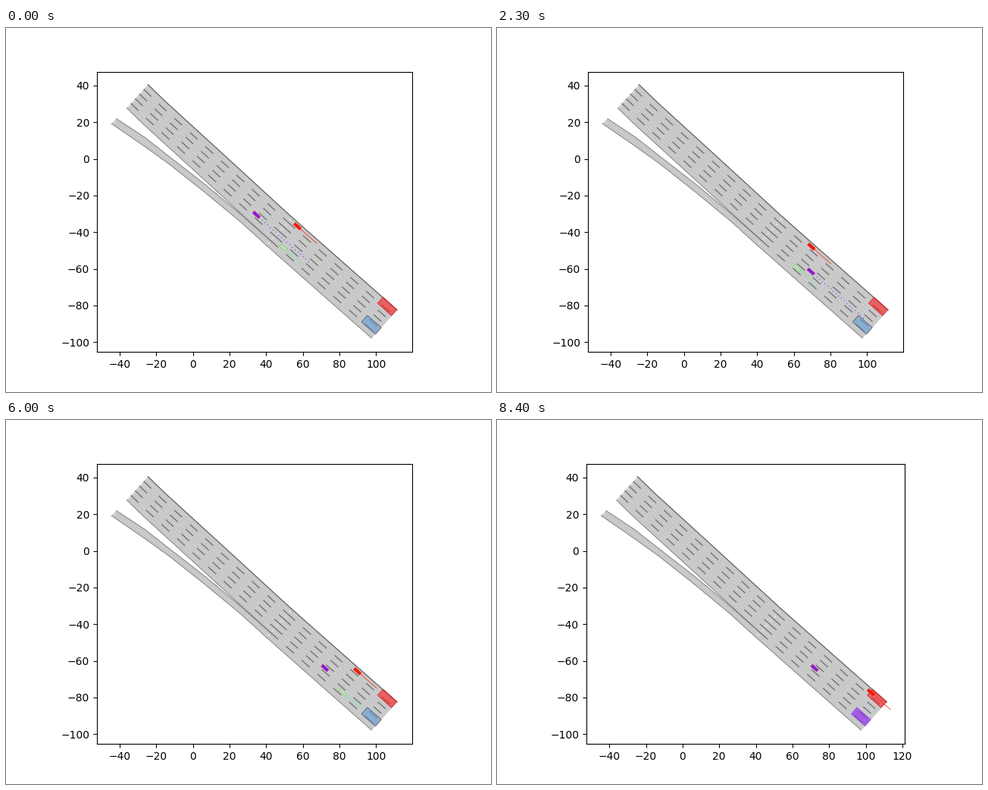
These frames come from a looping animation (640x480 px, 8500 ms). A matplotlib script:

```python
import numpy as np
import matplotlib.pyplot as plt
from matplotlib.animation import FuncAnimation
from matplotlib.patches import Polygon

FRAMES, STEP = 85, 100
LANE = 3.46
NORMAL = np.array([-0.672, -0.741])  # from the outer road edge to the ramp side
X_MIN, X_MAX = -44.68, 111.92
Y_MIN, Y_MAX = -98.4, 40.66
ROAD, MARK, LIGHT = "#c7c7c7", "#555555", "#dddddd"
JOIN = 53.8

# outer road edge, last point extends it past the end
EDGE_X = np.array([-24.6, -14.9, 17.85, 53.0, 79.95, 111.5, 140.0])
EDGE_Y = np.array([40.6, 31.2, 1.35, -30.9, -54.7, -82.5, -107.5])

fig, ax = plt.subplots(figsize=(6.4, 4.8), dpi=100)
ax.set_aspect("equal")


def lateral(x_edge, offset):
    """Points on the line that lies offset metres inside the outer edge."""
    x_edge = np.asarray(x_edge, float)
    y = np.interp(x_edge, EDGE_X, EDGE_Y)
    return np.column_stack([x_edge, y]) + offset * NORMAL


def lane_points(x, lane):
    """Points on the centre line of a lane at the given x."""
    offset = (lane + 0.5) * LANE
    return lateral(np.asarray(x) - offset * NORMAL[0], offset)


def box(center, length, width, angle):
    c, s = np.cos(angle), np.sin(angle)
    corners = np.array([[-1, -1], [1, -1], [1, 1], [-1, 1]]) * [length / 2, width / 2]
    return corners @ np.array([[c, s], [-s, c]]) + center


def line(points, color=MARK, lw=0.45, z=3, **kw):
    return ax.plot(points[:, 0], points[:, 1], color=color, lw=lw, zorder=z, **kw)[0]


def area(points, z=1, **kw):
    return ax.add_patch(Polygon(points, closed=True, zorder=z, **kw))


def start_mark(points):
    d = points[1] - points[0]
    d = d / np.hypot(*d)
    side = np.array([-d[1], d[0]]) * 0.6
    area([points[0] + side, points[0] + 1.4 * d, points[0] - side], z=2.5, fc="#e2e2e2", lw=0)


def draw_section(x_from, x_to, lanes):
    inner = EDGE_X[(EDGE_X > x_from) & (EDGE_X < x_to)]
    xs = np.concatenate([[x_from], inner, [x_to]])
    if xs[1] - xs[0] < 1:
        xs = np.delete(xs, 1)
    for i in range(lanes):
        left, right = lateral(xs, i * LANE), lateral(xs, (i + 1) * LANE)
        area(np.vstack([left, right[::-1]]), fc=ROAD, lw=0)
        middle = (left + right) / 2
        line(middle, LIGHT, 0.3, 2)
        start_mark(middle)
        if i:
            line(left, lw=0.7, dashes=(10 / 0.7, 10 / 0.7))
    line(lateral(xs, 0), lw=0.8)
    line(lateral(xs, lanes * LANE))


def draw_ramp():
    upper = np.array([[-41.8, 22.0], [-26.5, 11.9], [-13.2, 1.5], [6.25, -13.6],
                      [24.0, -28.4], lateral(JOIN, 5 * LANE)[0]])
    lower = np.array([[-44.6, 19.3], [-26.9, 7.1], [-13.2, -2.7], [6.25, -18.1],
                      [26.1, -34.5], lateral(JOIN, 6 * LANE)[0]])
    area(np.vstack([upper, lower[::-1]]), fc=ROAD, lw=0)
    line(upper)
    line(lower)
    middle = (upper + lower) / 2
    line(middle, LIGHT, 0.3, 2)
    start_mark(middle)


draw_ramp()
draw_section(EDGE_X[0], JOIN, 5)
draw_section(JOIN, EDGE_X[-2], 6)

red_goal = area(box((106.1, -80.5), 10.2, 4.5, np.radians(-42)), z=4,
                fc=(1, 0.1, 0.1, 0.6), ec=(0.8, 0.12, 0.15, 0.8), lw=0.6)
lane_goal = area(box((97.45, -90.5), 10.1, 4.8, np.radians(-41)), z=4)


class Car:
    def __init__(self, x, speed, lane, stop, reach, fill, edge, path):
        self.x, self.speed, self.lane = x, speed, lane
        self.stop, self.reach = stop, reach
        self.body = area(np.zeros((4, 2)), z=7, fc=fill, ec=edge, lw=0.5)
        self.paths = [line(np.zeros((1, 2)), z=6, **style) for style in path]

    def place(self, t):
        return self.x + self.speed * min(t, self.stop)

    def horizon(self, t):
        return self.place(t) + self.speed * np.linspace(0, self.reach, 20)

    def update(self, t, shown=True):
        x = self.place(t)
        back, mid, front = lane_points([x - 2, x, x + 2], self.lane)
        d = front - back
        self.body.set_xy(box(mid, 4.4, 1.6, np.arctan2(d[1], d[0])))
        self.body.set_visible(shown)
        ahead = lane_points(self.horizon(t), self.lane)
        for p in self.paths:
            p.set_data(ahead[:, 0], ahead[:, 1])
            p.set_visible(shown and t < self.stop)


red = Car(57.0, 5.46, 0, 99, 1.94, "#f0180c", "#f5301c", [dict(color="#ff3a20", lw=0.6)])
purple = Car(34.6, 15.1, 3, 2.48, 1.88, "#8418ee", "#c0407a",
             [dict(color="#d2c4f4", lw=0.5),
              dict(color="#5a22c8", lw=0, marker=".", ms=1.4, mew=0)])
green = Car(49.3, 5.44, 4, 99, 1.94, "#c6dcbc", "#70e068",
            [dict(color="#86eca6", lw=0.6)])


def update(i):
    t = i * STEP / 1000
    for car in (red, purple):
        car.update(t)
    done = i >= 83
    green.update(t, not done)
    if done:
        lane_goal.set(facecolor=(0.58, 0.2, 0.93, 0.72), edgecolor=(0.6, 0.3, 0.88, 0.8), linewidth=0.6)
    else:
        lane_goal.set(facecolor=(0.37, 0.62, 0.83, 0.6), edgecolor=(0.4, 0.36, 0.45, 0.9), linewidth=0.7)

    right = max(X_MAX, red.horizon(t)[-1])
    pad_x, pad_y = 0.05 * (right - X_MIN), 0.05 * (Y_MAX - Y_MIN)
    ax.set_xlim(X_MIN - pad_x, right + pad_x)
    ax.set_ylim(Y_MIN - pad_y, Y_MAX + pad_y)
    return []


anim = FuncAnimation(fig, update, frames=FRAMES, interval=STEP, init_func=lambda: update(0),
                     repeat=True, repeat_delay=0, blit=False)
plt.show()
```
